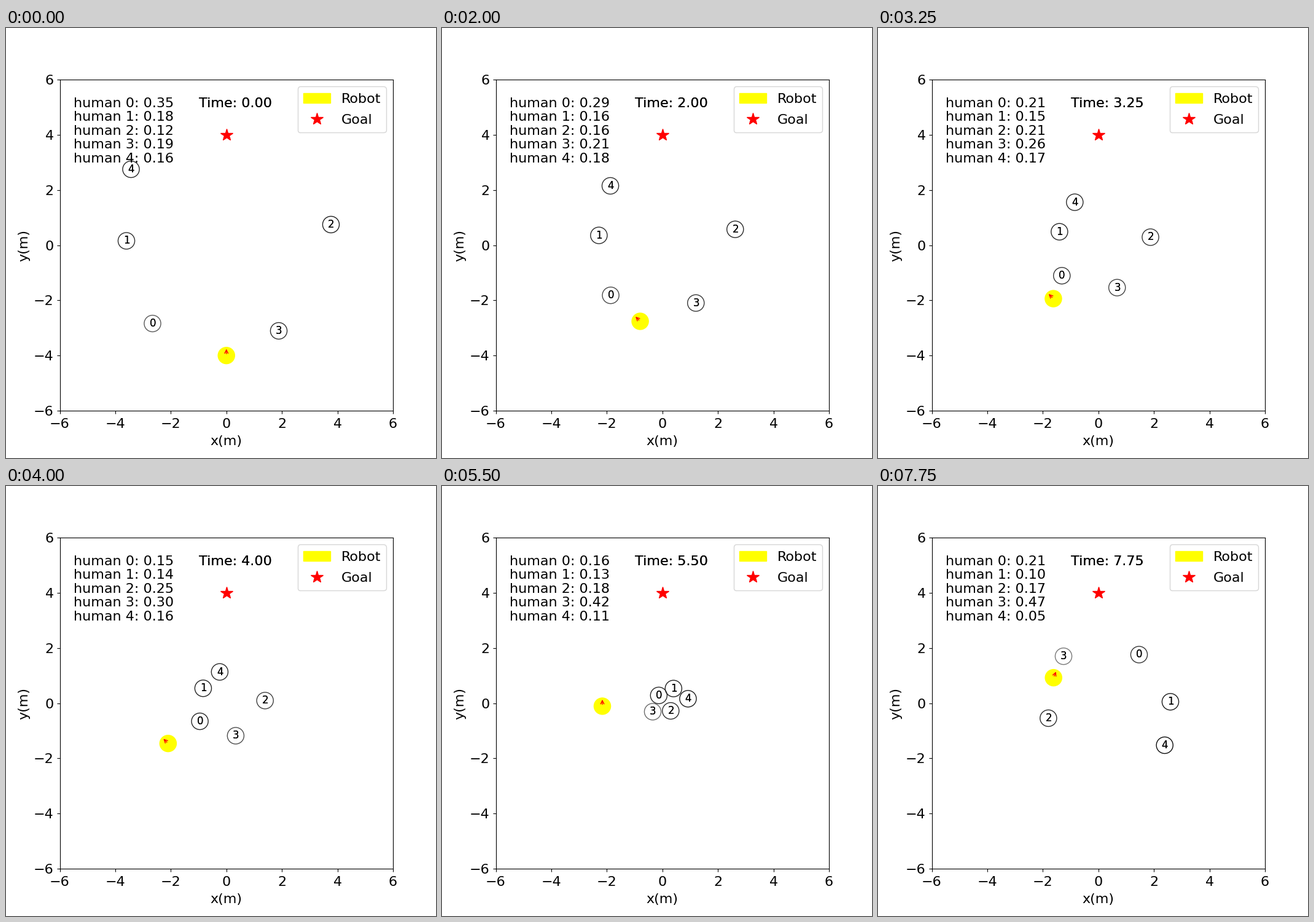
Animation, 700 px wide and 700 px high, one loop 8 s. Source, as a matplotlib script:

```python
import numpy as np
import matplotlib.pyplot as plt
from matplotlib import lines, patches
from matplotlib.animation import FuncAnimation
from matplotlib.transforms import Affine2D

FRAMES = 32
STEP = 0.25      # seconds per frame
RADIUS = 0.3
OFFSET = 0.11    # shift that centres a digit in its circle
SIZE = 700

plt.rcParams['text.hinting'] = 'force_autohint'

# Each human follows a cubic curve through four places (x + yj)
KNOTS = [0, 10, 22, 31]
PLACES = np.array([
    [-2.66 - 2.84j, -1.65 - 1.54j, -0.13 + 0.28j, 1.465 + 1.759j],
    [-3.60 + 0.156j, -1.94 + 0.41j, 0.40 + 0.53j, 2.593 + 0.05j],
    [3.766 + 0.746j, 2.33 + 0.47j, 0.30 - 0.28j, -1.80 - 0.545j],
    [1.886 - 3.106j, 1.0 - 1.875j, -0.348 - 0.31j, -1.255 + 1.70j],
    [-3.434 + 2.75j, -1.465 + 1.93j, 0.923 + 0.16j, 2.388 - 1.525j],
])
CURVES = np.linalg.solve(np.vander(KNOTS, 4), PLACES.T)

# Attention on humans 0, 1, 3 and 4; human 2 gets what is left of 1
SCORE_KEYS = [0, 10, 16, 22, 27, 31]
SCORES = [
    [0.35, 0.27, 0.15, 0.16, 0.14, 0.21],
    [0.18, 0.16, 0.14, 0.13, 0.08, 0.10],
    [0.19, 0.22, 0.30, 0.42, 0.57, 0.47],
    [0.16, 0.18, 0.16, 0.11, 0.05, 0.05],
]

# Legs of the robot's path: frames, heading in degrees, metres per frame
LEGS = [
    (2, 90, 0.22), (3, 135, 0.127), (4, 135, 0.25), (1, 157.5, 0.25),
    (1, 112.5, 0.25), (6, 135, 0.225), (1, 112.5, 0.25), (2, 67.5, 0.25),
    (2, 90, 0.25), (1, 90, 0.22), (4, 45, 0.18), (3, 90, 0.07),
    (1, 67.5, 0.1),
]
MOVES = [step * np.exp(1j * np.radians(turn))
         for n, turn, step in LEGS for _ in range(n)]
PATH = np.cumsum([-4j] + MOVES)
HEADINGS = np.angle([1j] + MOVES)


def attention(frame):
    scores = [np.interp(frame, SCORE_KEYS, row) for row in SCORES]
    scores.insert(2, 1 - sum(scores))
    return scores


def heavy_text(x, y, size):
    """Text drawn twice, which darkens its edges."""
    text = ax.text(x, y, '', fontsize=size, color='black')
    ax.add_artist(text)
    return text


def star(x, y, **kw):
    return lines.Line2D([x], [y], color='red', marker='*', linestyle='None',
                        markersize=15, **kw)


def draw_legend(left, bottom, width, height):
    """Legend box in pixels, measured from the lower left corner."""
    px = Affine2D().scale(1 / SIZE) + fig.transFigure
    em = 16 * 100 / 72
    x = left + 0.4 * em
    row1, row2 = bottom + 48, bottom + 14
    fig.add_artist(patches.FancyBboxPatch(
        (left, bottom), width, height, transform=px, snap=True,
        boxstyle=f'round,pad=0,rounding_size={0.2 * em}',
        facecolor='white', edgecolor='0.8', alpha=0.8))
    fig.add_artist(patches.Rectangle((x, row1), 2 * em, 0.7 * em,
                                     color='yellow', transform=px))
    fig.add_artist(star(x + em, row2 + 0.35 * em, transform=px))
    for y, label in ((row1, 'Robot'), (row2, 'Goal')):
        fig.text(x + 2.8 * em, y, label, fontsize=16, transform=px)


fig, ax = plt.subplots(figsize=(7, 7), dpi=100)
ax.set_xlim(-6, 6)
ax.set_ylim(-6, 6)
ax.tick_params(labelsize=16)
ax.tick_params(axis='x', pad=16.5)
plt.setp(ax.get_xticklabels(), va='baseline')
ax.set_xlabel('x(m)', fontsize=16, va='baseline')
ax.set_ylabel('y(m)', fontsize=16, va='baseline')
ax.xaxis.set_label_coords(0.5, -0.1045)
ax.yaxis.set_label_coords(-0.0968, 0.5)
draw_legend(474.9, 530, 144, 74.9)

robot = ax.add_artist(plt.Circle((0, -4), RADIUS, color='yellow'))
ax.add_artist(star(0, 4))

count = len(PLACES)
humans = [ax.add_artist(plt.Circle((0, 0), RADIUS, fill=False))
          for _ in range(count)]
digits = [heavy_text(0, 0, 12) for _ in range(count)]
labels = [ax.text(-5.5, 5 - 0.5 * i, '', fontsize=16) for i in range(count)]
clock = heavy_text(-1, 5, 16)

arrow = ax.add_artist(patches.FancyArrowPatch(
    (0, 0), (0, 1), color='red',
    arrowstyle=patches.ArrowStyle('->', head_length=4, head_width=2)))


def update(frame):
    pos = PATH[frame]
    tip = pos + RADIUS * np.exp(1j * HEADINGS[frame])
    robot.center = pos.real, pos.imag
    arrow.set_positions((pos.real, pos.imag), (tip.real, tip.imag))

    places = np.polyval(CURVES, frame)
    for i, (place, score) in enumerate(zip(places, attention(frame))):
        x, y = place.real, place.imag
        humans[i].center = x, y
        humans[i].set_edgecolor(str(score))
        digits[i].set_position((x - OFFSET, y - OFFSET))
        digits[i].set_text(str(i))
        labels[i].set_text(f'human {i}: {score:.2f}')

    clock.set_text(f'Time: {frame * STEP:.2f}')
    return [robot, arrow, clock, *humans, *digits, *labels]


anim = FuncAnimation(fig, update, frames=FRAMES, interval=250, repeat=True,
                     repeat_delay=0, blit=False)
plt.show()
```
